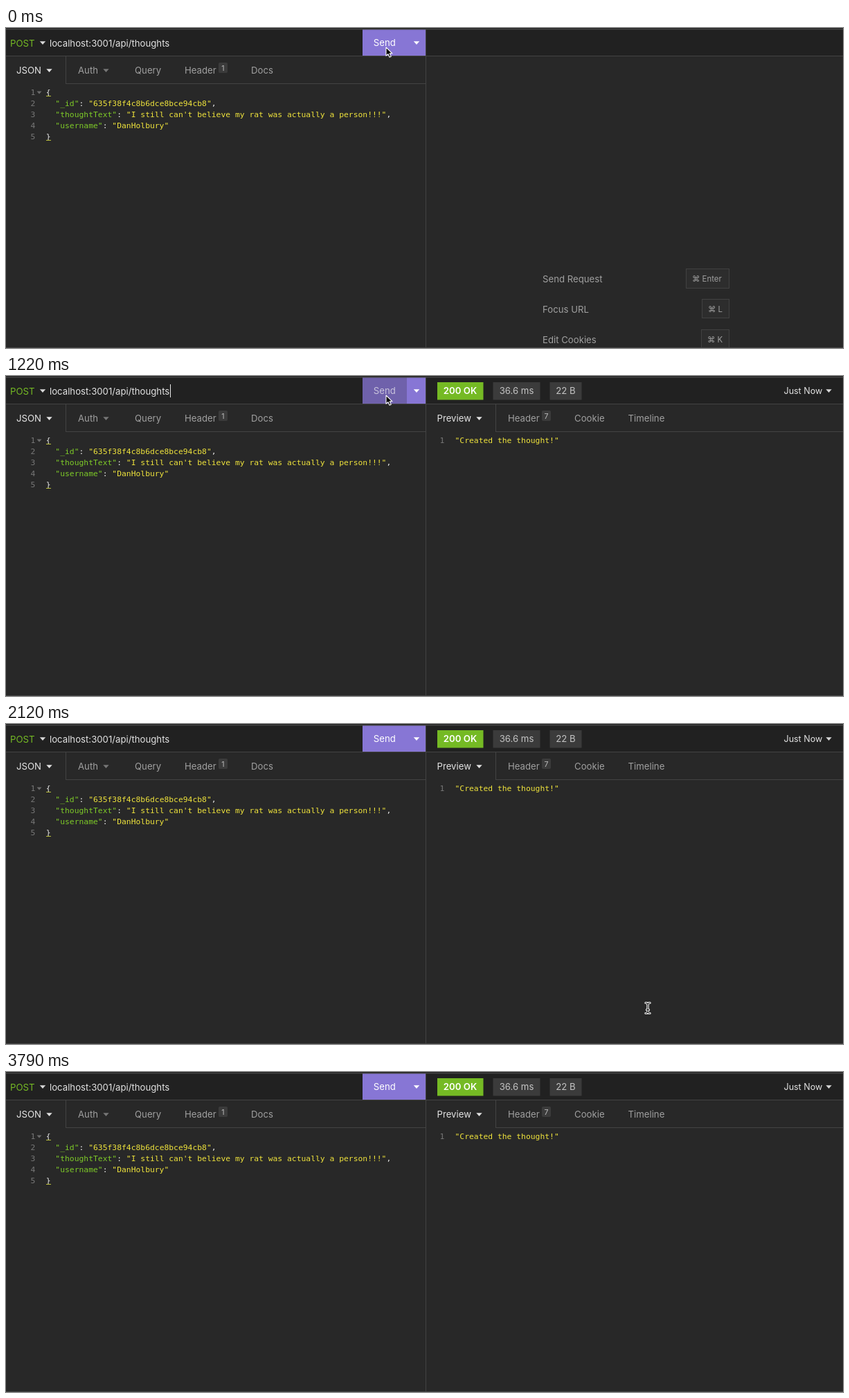
Write an HTML page that moves like this. It is 1209 by 463 pixels and loops after 4.33 s.

```html
<!DOCTYPE html>
<html lang="en">
<head>
<meta charset="utf-8">
<title>API request</title>
<style>
  html, body { margin: 0; width: 100%; height: 100%; overflow: hidden; background: #282828; }
  svg { display: block; width: 1209px; height: 463px; }
  text { font: 13.2px Inter, "Liberation Sans", sans-serif; fill: #a0a0a0; white-space: pre; }
  .lit { fill: #e3e3e3; }
  .mid { text-anchor: middle; }
  .badge { font-size: 10.5px; fill: #bdbdbd; }
  .small { font-size: 11.4px; }
  .code text { font: 11.35px "DejaVu Sans Mono", monospace; fill: #e8e8e8; }
  .code .num { fill: #787878; }
  .code .key { fill: #7ecb28; }
  .code .str { fill: #f0e43c; }
  .line { fill: #434343; }
  .chip { fill: #3b3b3b; }
  .kbd { fill: #2d2d2d; stroke: #414141; }
</style>
</head>
<body>
<svg viewBox="0 0 1209 463">
  <defs>
    <path id="drop" d="M-4.2-2.2H4.2L0 2.5Z"/>
    <path id="half" d="M-18.9-5.1A19.6 19.6 0 0 1 14.6-13.1" fill="none" stroke="#dcdcdc" stroke-width="7.8"/>
    <path id="head" d="M22.5-18.6V-4.9H8.8Z" fill="#dcdcdc" stroke="#dcdcdc" stroke-width="2" stroke-linejoin="round"/>
  </defs>

  <rect width="1209" height="463" fill="#282828"/>
  <rect width="1209" height="40" fill="#212121"/>

  <!-- request pane -->
  <text x="6" y="26.5" style="fill:#75ba24">POST</text>
  <use href="#drop" x="53" y="21.5" fill="#d8d8d8"/>
  <text class="lit" x="63" y="26.5">localhost:3001/api/thoughts</text>
  <rect id="caret" x="237" y="12" width="1" height="19" fill="#e8e8e8"/>
  <rect x="515" y="2" width="91" height="38.5" fill="#8776d5"/>
  <rect id="send" x="515" y="2" width="64" height="38.5"/>
  <text id="sendText" class="mid" x="546.8" y="26.3">Send</text>
  <use href="#drop" x="593" y="21.5" fill="#fff"/>

  <text class="lit" x="15" y="66">JSON</text>
  <use href="#drop" x="62.5" y="61.5" fill="#e3e3e3"/>
  <text x="104" y="66">Auth</text>
  <use href="#drop" x="144.5" y="61.5" fill="#777"/>
  <text x="186" y="66">Query</text>
  <text x="258" y="65.7">Header</text>
  <rect class="chip" x="307" y="50" width="13" height="15" rx="2"/>
  <text class="badge mid" x="313.5" y="61.5">1</text>
  <text x="354" y="66">Docs</text>

  <g id="body" class="code"></g>
  <path d="M44.5 91.5h7l-3.5 4z" fill="#6c6c6c"/>
  <path d="M58 98.5h7M58 162.5h7" stroke="#b9bd3a"/>

  <!-- idle response pane -->
  <g id="idle">
    <text x="775" y="367.5">Send Request</text>
    <text x="775" y="411.5">Focus URL</text>
    <text x="775" y="455.5">Edit Cookies</text>
    <rect class="kbd" x="982.5" y="348.5" width="62" height="28"/>
    <rect class="kbd" x="1005.5" y="392.5" width="39" height="27"/>
    <rect class="kbd" x="1004.5" y="436.5" width="40" height="28"/>
    <text class="small" x="991" y="367">⌘ Enter</text>
    <text class="small" x="1014" y="411">⌘ L</text>
    <text class="small" x="1013" y="455">⌘ K</text>
  </g>

  <!-- finished response -->
  <g id="reply">
    <rect x="623" y="9" width="66.5" height="25.5" fill="#75ba24"/>
    <text class="mid" x="656" y="26.3" style="fill:#fff;font-weight:600">200 OK</text>
    <rect class="chip" x="703.5" y="9" width="68" height="25.5"/>
    <text class="mid" x="737.5" y="26.3" style="fill:#c4c4c4">36.6 ms</text>
    <rect class="chip" x="785.5" y="9" width="46" height="25.5"/>
    <text class="mid" x="808.5" y="26.3" style="fill:#c4c4c4">22 B</text>
    <text class="lit" x="1123.5" y="26" style="font-size:12.5px">Just Now</text>
    <use href="#drop" x="1188.5" y="21.5" fill="#d8d8d8"/>
    <text class="lit" x="622.5" y="66">Preview</text>
    <use href="#drop" x="683.5" y="61.5" fill="#e3e3e3"/>
    <text x="725" y="65.7">Header</text>
    <rect class="chip" x="774" y="50" width="13" height="15" rx="2"/>
    <text class="badge mid" x="780.5" y="61.5">7</text>
    <text x="821" y="66">Cookie</text>
    <text x="898.5" y="66">Timeline</text>
    <rect class="line" x="707" y="41" width="1" height="39"/>
    <rect class="line" x="707" y="80" width="502" height="1"/>
    <g class="code">
      <text class="num" x="626.5" y="97">1</text>
      <text class="str" x="648.5" y="97">"Created the thought!"</text>
    </g>
  </g>

  <!-- frame lines -->
  <rect class="line" y="1" width="1209" height="1.5"/>
  <rect class="line" y="40" width="1209" height="1"/>
  <rect class="line" x="86" y="41" width="1" height="39"/>
  <rect class="line" x="86" y="80" width="520" height="1"/>

  <g id="loading">
    <rect x="607" y="2.5" width="602" height="460.5" fill="#1e1e1e" opacity=".85"/>
    <text class="mid" x="909.7" y="366" style="font-size:19.9px;fill:#dcdcdc">Loading…</text>
    <g transform="translate(910 422.5) rotate(7)">
      <use href="#half"/><use href="#head"/>
      <g transform="rotate(180)"><use href="#half"/><use href="#head"/></g>
    </g>
  </g>
  <rect class="line" x="606" y="2" width="1" height="461"/>
  <rect class="line" y="462" width="1209" height="1"/>

  <g id="pointer">
    <path id="arrow" d="M0 0V12.2L2.9 9.6 5 14.2 7.2 13.2 5.2 8.8H9Z" fill="#000" stroke="#fff" stroke-width="1.1" stroke-linejoin="round"/>
    <g id="beam" fill="none" stroke-linecap="round">
      <path id="bar" d="M-3-7.5Q0-7.5 0-5.5Q0-7.5 3-7.5M0-5.5V5.5M-3 7.5Q0 7.5 0 5.5Q0 7.5 3 7.5M-1.5 2.5H1.5" stroke="#e8e8e8" stroke-width="3"/>
      <use href="#bar"/>
      <path d="M-3-7.5Q0-7.5 0-5.5Q0-7.5 3-7.5M0-5.5V5.5M-3 7.5Q0 7.5 0 5.5Q0 7.5 3 7.5M-1.5 2.5H1.5" stroke="#111" stroke-width="1"/>
    </g>
  </g>
</svg>
<script>
  const LOOP = 4330;
  const $ = id => document.getElementById(id);
  const show = (id, on) => { $(id).style.opacity = Number(on); };

  // [key, value, tail] for each field of the request body
  const fields = [
    ["_id", "635f38f4c8b6dce8bce94cb8", ","],
    ["thoughtText", "I still can't believe my rat was actually a person!!!", ","],
    ["username", "DanHolbury", ""],
  ];
  const span = (cls, s) => `<tspan class="${cls}">"${s}"</tspan>`;
  const lines = ["{", ...fields.map(([k, v, tail]) => `  ${span("key", k)}: ${span("str", v)}${tail}`), "}"];
  $("body").innerHTML = lines.map((line, i) => {
    const y = 97 + i * 16;
    return `<text class="num" x="35.5" y="${y}">${i + 1}</text><text x="57.7" y="${y}">${line}</text>`;
  }).join("");

  // pointer stops: time, x, y
  const path = [
    [0, 549, 28], [1260, 549, 28], [1540, 797, 437], [1690, 797, 437],
    [1800, 933, 436], [1880, 1029, 437], [2040, 1029, 437],
    [2380, 600, 326], [2490, 560, 306], [2690, 560, 306], [2800, 1065, 472],
  ];
  const blinks = [210, 720, 1220, 1710, 2220, 2730, 3280, 3790];

  function pointerAt(t) {
    const i = path.findIndex(p => p[0] > t);
    if (i < 0) return path[path.length - 1].slice(1);
    const [t0, x0, y0] = path[i - 1], [t1, x1, y1] = path[i];
    const k = (t - t0) / (t1 - t0);
    return [x0 + (x1 - x0) * k, y0 + (y1 - y0) * k];
  }

  function draw(t) {
    const [x, y] = pointerAt(t);
    $("pointer").setAttribute("transform", `translate(${Math.round(x)} ${Math.round(y)})`);
    show("pointer", t < 2800);
    show("arrow", y < 80);
    show("beam", y >= 80);

    const pressed = t >= 120 && y < 40;
    $("send").style.fill = pressed ? "#6f61ab" : "#8776d5";
    $("sendText").style.fill = pressed ? "#c8c3dc" : "#fff";

    show("caret", blinks.filter(b => b <= t).length % 2);
    show("idle", t < 270);
    show("reply", t >= 270);
    show("loading", t < 150 || t >= 270 ? 0 : t < 210 ? 0.5 : 1);
  }

  const start = performance.now();
  function tick() {
    draw((performance.now() - start) % LOOP);
    requestAnimationFrame(tick);
  }
  draw(0);
  requestAnimationFrame(tick);
</script>
</body>
</html>
```
